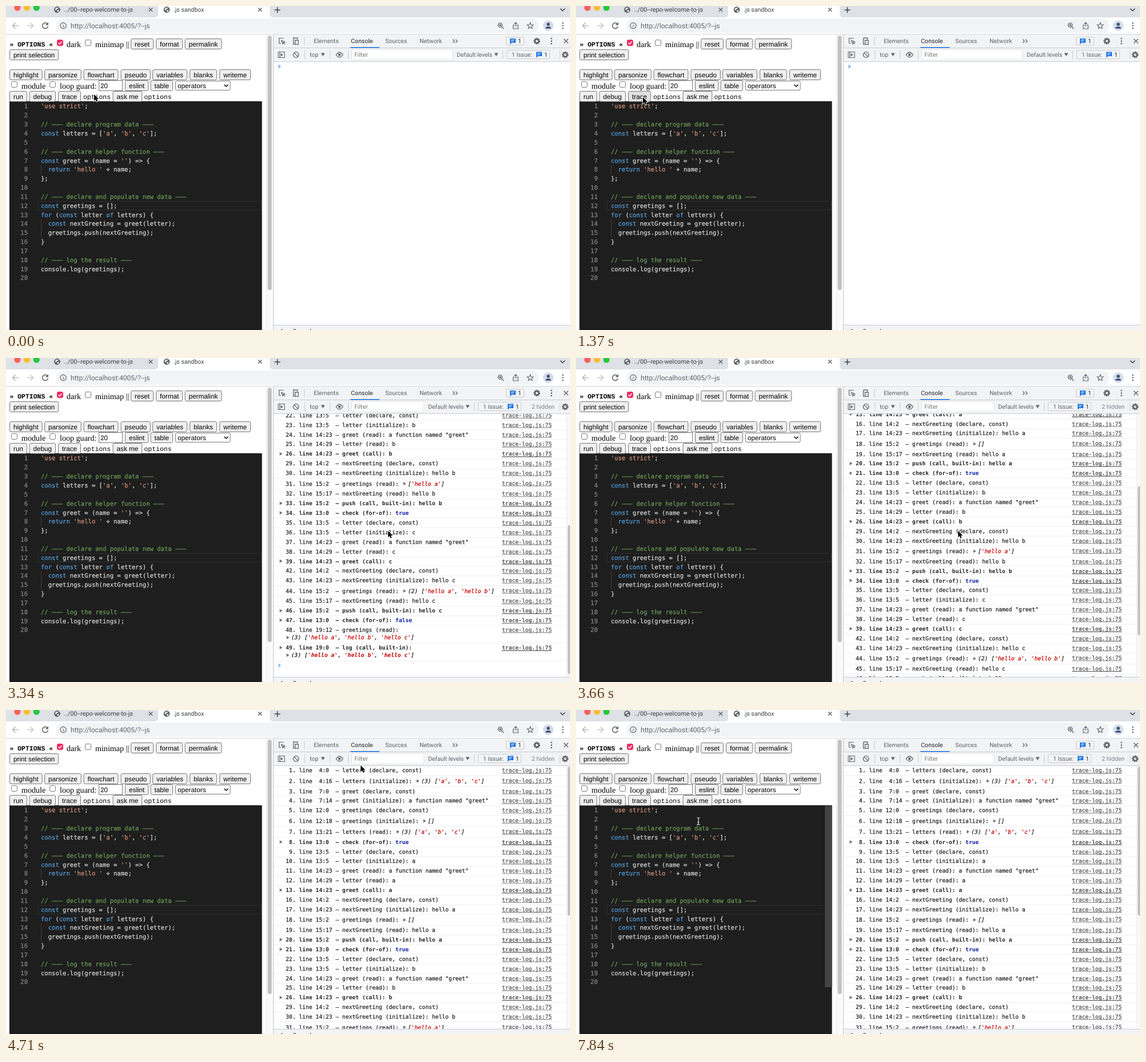
An HTML page with a canvas that plays this animation: 986x568 px, repeating every 7.99 s.

```html
<!DOCTYPE html>
<html lang="en">
<head>
<meta charset="utf-8">
<title>Code tracing</title>
<style>
html, body { margin: 0; width: 100%; height: 100%; overflow: hidden; background: #fff; }
canvas { display: block; }
</style>
</head>
<body>
<canvas width="986" height="568"></canvas>
<script>
const ctx = document.querySelector('canvas').getContext('2d');
const LOOP = 7990, TICK = 150;
const UI = 'Roboto, sans-serif';
const SANS = '"Liberation Sans", Arial, sans-serif';
const SERIF = '"Liberation Serif", Times, serif';
const MONO = '"DejaVu Sans Mono", monospace';
const TYPE = '"Liberation Mono", Courier, monospace';
const INK = '#5f6368', DARK = '#202124', BLUE = '#1a73e8', BAR = '#f1f3f4', RULE = '#cacdd1';

// ---------- drawing helpers ----------
function rect(x, y, w, h, fill, stroke, radius = 0) {
  ctx.beginPath();
  ctx.roundRect(x, y, w, h, radius);
  if (fill) { ctx.fillStyle = fill; ctx.fill(); }
  if (stroke) { ctx.strokeStyle = stroke; ctx.lineWidth = 1; ctx.stroke(); }
}
function circle(x, y, r, fill) {
  ctx.beginPath();
  ctx.arc(x, y, r, 0, 7);
  ctx.fillStyle = fill;
  ctx.fill();
}
function stroke(path, color = INK, width = 1.4, x = 0, y = 0) {
  ctx.save();
  ctx.translate(x, y);
  ctx.strokeStyle = color;
  ctx.lineWidth = width;
  ctx.stroke(new Path2D(path));
  ctx.restore();
}
function fill(path, color, x = 0, y = 0) {
  ctx.save();
  ctx.translate(x, y);
  ctx.fillStyle = color;
  ctx.fill(new Path2D(path));
  ctx.restore();
}
// y is the middle of the capitals; returns the x where the text ends
function text(str, x, y, size, family, color = '#000', style = '') {
  const baseline = y + size * 0.36;
  ctx.font = `${style} ${size}px ${family}`;
  ctx.fillStyle = ctx.strokeStyle = color;
  ctx.fillText(str, x, baseline);
  if (family === MONO && !style.includes('bold')) {
    ctx.lineWidth = .25; // slightly heavier code type
    ctx.strokeText(str, x, baseline);
  }
  return x + ctx.measureText(str).width;
}
const cross = (x, y, r = 3.2, color = INK) =>
  stroke(`M${-r} ${-r}L${r} ${r}M${r} ${-r}L${-r} ${r}`, color, 1.4, x, y);
const dots = (x, y, gap) => [-gap, 0, gap].forEach(d => circle(x, y + d, 1.3, INK));
const arrowRight = (x, y) => fill('M0 -3L4.8 0L0 3Z', '#6e6e6e', x, y);
const arrowDown = (x, y) => fill('M-3.4 -2.5H3.4L0 3Z', INK, x, y);

function gear(x, y) {
  ctx.setLineDash([2.2, 1.5]);
  stroke('M5 0A5 5 0 1 1 -5 0A5 5 0 1 1 5 0', INK, 1.8, x, y);
  ctx.setLineDash([]);
  stroke('M3.3 0A3.3 3.3 0 1 1 -3.3 0A3.3 3.3 0 1 1 3.3 0', INK, 2.4, x, y);
}
function globe(x, y) {
  circle(x, y, 5.4, INK);
  fill('M-3.5 -1.5Q-1 -4 2 -3.6Q1 -1 -1 -1Q-1 1 -3 1ZM0 1Q3 0 3.6 2Q2 4 0.5 4Z', '#fff', x, y);
}
function button(label, x, y, face = '#efefef') {
  ctx.font = `11.73px ${SANS}`;
  rect(x, y - 9, ctx.measureText(label).width + 13, 18, face, '#767676', 2.6);
  text(label, x + 6.5, y, 11.73, SANS);
}
function checkbox(x, y, checked) {
  rect(x + .5, y + .5, 10, 10, checked ? '#ee2a62' : '#fff', checked ? '#ee2a62' : '#767676', 2);
  if (checked) stroke('M2.6 5.8L4.6 7.9L8.6 3.2', '#fff', 1.6, x, y);
}
function issueBadge(x, y) {
  fill('M-5 -4.5H5V3H-2L-5 5.5Z', BLUE, x, y);
  stroke('M-3 -2H3M-3 .5H1', '#fff', 1, x, y);
  text('1', x + 9, y, 10.4, UI, DARK);
}

// ---------- browser frame ----------
function drawBrowser() {
  rect(0, 0, 986, 20, '#dee1e6');
  ['#ff5f57', '#febc2e', '#28c840'].forEach((c, i) => circle(20 + i * 16.6, 3, 5.6, c));
  fill('M260 20Q266 20 266 13V0H461V13Q461 20 467 20Z', '#fff');
  globe(89.5, 6.5);
  text('../00--repo-welcome-to-js', 102, 6, 10.8, UI, '#3c4043');
  cross(253, 6.5);
  globe(281, 6.5);
  text('.js sandbox', 293, 6, 10.5, UI, '#3c4043');
  cross(444, 6.5);
  stroke('M-5 0H5M0 -5V5', '#3c4043', 1.5, 474.5, 7);
  stroke('M-4 -2L0 2L4 -2', '#3c4043', 1.5, 973, 6.5);

  rect(0, 20, 986, 29, '#fff');
  rect(88, 22, 844, 25, BAR, null, 12.5);
  stroke('M5.5 0H-5M0 -5L-5 0L0 5', '#b4b7bb', 1.5, 16.5, 34.5);
  stroke('M-5.5 0H5M0 -5L5 0L0 5', '#c6c8cb', 1.5, 42.5, 34.5);
  stroke('M4 -3.2A5 5 0 1 0 5 1.2', INK, 1.6, 68.5, 34.5);
  fill('M0 -1H5.3V-6Z', INK, 68.7, 34.5);
  stroke('M5.2 0A5.2 5.2 0 1 1 -5.2 0A5.2 5.2 0 1 1 5.2 0M0 -.8V3M0 -3V-1.9', INK, 1.2, 100, 34.5);
  text('http://localhost:4005/?--js', 113, 34.5, 12.05, UI, '#5f6368');
  stroke('M2.6 -1A3.6 3.6 0 1 1 -4.6 -1A3.6 3.6 0 1 1 2.6 -1M1.6 1.8L5.4 5.4M-3 -1H1M-1 -3V1', INK, 1.4, 865, 34.5);
  stroke('M-2 -1H-4.3V5.5H4.3V-1H2M0 2V-5.3M-2.6 -3L0 -5.5L2.6 -3', INK, 1.2, 891, 34.5);
  stroke('M0 -5.2L1.5 -1.7L5.3 -1.4L2.4 1.1L3.3 4.8L0 2.8L-3.3 4.8L-2.4 1.1L-5.3 -1.4L-1.5 -1.7Z', INK, 1.2, 916.5, 34.5);
  circle(948, 34.5, 9.3, '#d5dcea');
  circle(948, 32, 2.7, '#3d4b6e');
  fill('M-5 5Q-5 1.5 0 1.5Q5 1.5 5 5Z', '#3d4b6e', 948, 34.5);
  dots(973.5, 34.5, 4.5);
  rect(0, 49, 986, 1, '#d5d7da');
}

// ---------- page on the left ----------
function drawOptions(traceFace) {
  text('» OPTIONS «', 6.5, 67, 11.44, TYPE, '#000', 'bold');
  checkbox(89, 59, true);
  text('dark', 106, 66.5, 14.08, SERIF);
  checkbox(138, 59);
  text('minimap ||', 156, 66.5, 14.08, SERIF);
  button('reset', 218.5, 66.5);
  button('format', 262.5, 66.5);
  button('permalink', 313, 66.5);
  button('print selection', 6.5, 85.5);

  [['highlight', 6.5], ['parsonize', 67.5], ['flowchart', 136], ['pseudo', 201], ['variables', 256.5],
   ['blanks', 321.5], ['writeme', 373.5]].forEach(([label, x]) => button(label, x, 120.5));

  checkbox(9, 132);
  text('module', 27, 139.5, 14.08, SERIF);
  checkbox(76, 132);
  text('loop guard:', 94, 139.5, 14.08, SERIF);
  rect(162.5, 130.5, 41, 18, '#fff', '#767676');
  text('20', 165, 139.5, 11.73, SANS);
  button('eslint', 208.5, 139.5);
  button('table', 253, 139.5);
  rect(296.5, 131.5, 95.5, 16, '#fff', '#767676', 2);
  text('operators', 300, 139.5, 11.73, SANS);
  stroke('M-3.5 -1.8L0 1.8L3.5 -1.8', '#000', 1.4, 385, 139.5);

  button('run', 6.5, 158.5);
  button('debug', 41, 158.5);
  button('trace', 91.5, 158.5, traceFace);
  text('options', 135, 159, 11.44, TYPE);
  button('ask me', 187, 158.5);
  text('options', 241.5, 159, 11.44, TYPE);
}

// Long dashes join into a rule, as in the editor's typeface.
const CODE = `'use strict';

// ––– declare program data –––
const letters = ['a', 'b', 'c'];

// ––– declare helper function –––
const greet = (name = '') => {
  return 'hello ' + name;
};

// ––– declare and populate new data –––
const greetings = [];
for (const letter of letters) {
  const nextGreeting = greet(letter);
  greetings.push(nextGreeting);
}

// ––– log the result –––
console.log(greetings);
`.split('\n');

function tokenColor(token) {
  if (token.startsWith('//')) return '#6a9955';
  if (token.startsWith("'")) return '#ce9178';
  return /^(const|for|of|return)$/.test(token) ? '#569cd6' : '#d4d4d4';
}
function drawEditor(hovered) {
  const size = 10.55, pitch = 15.84;
  rect(6, 167, 441.5, 401, '#1e1e1e');
  rect(55, 342.5, 391.5, 15, null, '#2f2f2f');
  rect(61, 279, 1, pitch, '#404040');
  rect(61, 374, 1, pitch * 2, '#404040');
  CODE.forEach((line, i) => {
    const y = 175.7 + i * pitch;
    ctx.textAlign = 'right';
    text(i + 1, 38, y, size, MONO, '#858585');
    ctx.textAlign = 'left';
    let x = 61;
    for (const token of line.match(/\/\/.*|'[^']*'|\w+|[^\w']+?(?=\/\/|\w|'|$)/g) || [])
      x = text(token, x, y, size, MONO, tokenColor(token));
  });
  if (hovered) rect(435, 168, 12.5, 318, '#424242');
}

const TRACE_OPTIONS = ['variables', 'declare', 'initialize', 'read', 'assign', 'functions', 'call', 'return',
  'built-in', 'operators', 'control flow', 'check', 'for-of', 'while', 'blocks', 'errors', 'this'];
function drawTraceOptions() {
  rect(134, 168, 168, 364, '#f9f9f9');
  TRACE_OPTIONS.forEach((label, i) => {
    const y = 185 + i * 20.6;
    checkbox(146, y - 6, true);
    text(label, 164, y, 14.08, SERIF);
  });
}

// ---------- trace log ----------
function buildTrace() {
  const rows = [], letters = ['a', 'b', 'c'], greetings = [];
  let step = 0, top = 0;
  const log = (place, message, extra = {}) => {
    const [line, col] = place.split(':');
    const at = `${line.padStart(2)}:${col}`.padEnd(5);
    const height = extra.wrap ? 31 : extra.list ? 19.2 : 16.9;
    rows.push({ text: `${String(++step).padStart(2)}. line ${at} – ${message}`, top, height, ...extra });
    top += height;
  };
  const bold = true, wrap = true;
  const check = flag => log('13:0', 'check (for-of): ', { bold, flag });

  log('4:0', 'letters (declare, const)');
  log('4:16', 'letters (initialize):', { list: letters });
  log('7:0', 'greet (declare, const)');
  log('7:14', 'greet (initialize): a function named "greet"');
  log('12:0', 'greetings (declare, const)');
  log('12:18', 'greetings (initialize):', { list: [] });
  log('13:21', 'letters (read):', { list: letters });
  for (const letter of letters) {
    const greeting = 'hello ' + letter;
    check('true');
    log('13:5', 'letter (declare, const)');
    log('13:5', `letter (initialize): ${letter}`);
    log('14:23', 'greet (read): a function named "greet"');
    log('14:29', `letter (read): ${letter}`);
    log('14:23', `greet (call): ${letter}`, { bold });
    step += 2; // collapsed inside the call
    log('14:2', 'nextGreeting (declare, const)');
    log('14:23', `nextGreeting (initialize): ${greeting}`);
    log('15:2', 'greetings (read):', { list: [...greetings] });
    log('15:17', `nextGreeting (read): ${greeting}`);
    log('15:2', `push (call, built-in): ${greeting}`, { bold });
    greetings.push(greeting);
  }
  check('false');
  log('19:12', 'greetings (read):', { list: greetings, wrap });
  log('19:0', 'log (call, built-in):', { list: greetings, wrap, bold });
  return { rows, height: top };
}
const trace = buildTrace();
const LOG_SIZE = 9.667;

function drawList(list, x, y, weight) {
  const put = (s, color = '#252525') => { x = text(s, x, y, LOG_SIZE, MONO, color, `italic ${weight}`); };
  arrowRight(x, y);
  x += 8;
  put((list.length > 1 ? `(${list.length}) ` : '') + '[');
  list.forEach((item, i) => {
    if (i) put(', ');
    put(`'${item}'`, '#c80000');
  });
  put(']');
}
function drawRow(row, y) {
  const weight = row.bold ? 'bold' : '';
  const single = row.list && !row.wrap;
  const mid = y + (single ? 10 : 8.4), linkMid = y + (single ? 8.9 : 8.4);
  rect(468, y, 512, 1, '#f0f0f0');
  if (row.bold) arrowRight(478.5, mid);
  const end = text(row.text, 489, mid, LOG_SIZE, MONO, '#252525', weight);
  if (row.flag) text(row.flag, end, mid, LOG_SIZE, MONO, '#0d22aa', weight);
  if (row.list) drawList(row.list, row.wrap ? 490.5 : end + 8, row.wrap ? mid + 13.3 : mid, weight);
  const linkEnd = text('trace-log.js:75', 867, linkMid, LOG_SIZE, MONO, '#545454', weight);
  rect(867, linkMid + 4.6, linkEnd - 867, row.bold ? 1.2 : .8, '#545454');
}
function drawConsole(filled, scroll) {
  ctx.save();
  ctx.beginPath();
  ctx.rect(468, 97, 518, 462);
  ctx.clip();
  let y = 97.6 - scroll;
  if (filled) {
    trace.rows.forEach(row => drawRow(row, y + row.top));
    y += trace.height;
    rect(468, y, 512, 1, '#f0f0f0');
    rect(980, 97, 6, 462, '#fafafa');
    rect(980, 97, 1, 462, '#e8e8e8');
    rect(982, 99 + scroll * .577, 8, 262, '#c1c1c1', null, 4);
  }
  stroke('M-1.8 -2.7L1.4 0L-1.8 2.7', '#4285f4', 1.2, 478, y + 8.6);
  ctx.restore();
}

// ---------- developer tools frame ----------
function drawTools(filled) {
  rect(467, 50, 1, 518, '#c4c6c9');
  rect(468, 50, 518, 47, BAR);
  rect(468, 73, 518, 1, RULE);
  rect(468, 97, 518, 1, RULE);
  stroke('M3 -5H-5V4H-2M-1 -1L5 1.4L2.4 2.4L1.4 5Z M2 2L5.4 5.4', INK, 1.2, 482.5, 61.5);
  stroke('M-3 -5.5H4V-3M-3 -5.5V5.5H-1M0 -1.5H5.5V5.8H0Z', INK, 1.3, 505.5, 61.5);
  rect(521, 54, 1, 15, RULE);
  [['Elements', 538], ['Console', 603], ['Sources', 663], ['Network', 723]].forEach(([tab, x]) =>
    text(tab, x, 61.5, 10.56, UI, tab === 'Console' ? DARK : INK));
  rect(602, 72, 51, 1.6, BLUE);
  stroke('M-4 -3L-1 0L-4 3M1 -3L4 0L1 3', INK, 1.2, 785, 61.5);
  rect(874.5, 54.5, 31, 14, BAR, RULE, 2);
  issueBadge(886, 61.5);
  gear(928, 61.5);
  dots(953.5, 61.5, 4.4);
  cross(979, 61.5, 3.8);

  stroke('M-5.5 -5H5.5V5H-5.5ZM-2.8 -5V5', INK, 1.1, 481.5, 85.5);
  fill('M0 -2.8L4 0L0 2.8Z', INK, 480.5, 85.5);
  stroke('M4.8 0A4.8 4.8 0 1 1 -4.8 0A4.8 4.8 0 1 1 4.8 0M-3.4 -3.4L3.4 3.4', INK, 1.3, 507, 85.5);
  rect(522, 78, 1, 15, RULE);
  text('top', 531, 85, 10.56, UI, INK);
  arrowDown(554, 85);
  rect(566, 78, 1, 15, RULE);
  stroke('M-6 0Q0 -8.5 6 0Q0 8.5 -6 0Z', INK, 1.3, 583, 85.5);
  circle(583, 85.5, 2.2, INK);
  rect(598, 78, 1, 15, RULE);

  const shift = filled ? -50 : 0;
  rect(604.5, 76.5, 176 + shift, 18, '#fff', '#e3e5e8');
  text('Filter', 609, 85.5, 10.56, UI, '#757575');
  text('Default levels', 788 + shift, 85, 10.4, UI, INK);
  arrowDown(857 + shift, 85);
  rect(868 + shift, 78, 1, 15, RULE);
  rect(875.5 + shift, 77.5, 75, 15, BAR, RULE, 2);
  text('1 Issue:', 884 + shift, 85, 10.4, UI, INK);
  issueBadge(932 + shift, 85);
  if (filled) text('2 hidden', 919, 85.5, 10.5, UI, '#80868b');
  rect(968, 78, 1, 15, RULE);
  gear(977.5, 85.5);

  rect(468, 559, 518, 9, BAR);
  rect(468, 559, 518, 1, RULE);
  circle(482, 568, 1.4, INK);
  text('Console', 501, 570.5, 10.56, UI, DARK);
}

// ---------- motion ----------
const POINTER = [
  [0, 154, 155], [7, 154, 156], [9, 117, 160], [15, 117, 160], [18, 668, 303], [28, 668, 303],
  [29, 667, 290], [31, 620, 97], [32, 608, 92], [36, 550, 106], [38, 552, 108], [40, 631, 124],
  [42, 570, 150], [44, 587, 185], [45, 592, 202], [48, 624, 243], [49, 624, 243], [50, 500, 228],
  [51, 178, 200], [52, 214, 195]];
const SCROLL = [[0, 342], [21, 342], [22, 336], [24, 217.5], [25, 90], [26, 0]];

function along(keys, tick) {
  const next = keys.findIndex(key => key[0] > tick);
  if (next < 0) return keys.at(-1).slice(1);
  const [from, to] = [keys[next - 1], keys[next]];
  const part = (tick - from[0]) / (to[0] - from[0]);
  return from.slice(1).map((v, i) => v + (to[i + 1] - v) * part);
}
function drawPointer(x, y, overEditor) {
  if (overEditor) {
    const beam = 'M-2.6 -6.3Q0 -6.3 0 -4.5V4.5Q0 6.3 -2.6 6.3M2.6 -6.3Q0 -6.3 0 -4.5V4.5Q0 6.3 2.6 6.3M-1.5 2H1.5';
    stroke(beam, '#111', 2.4, x, y);
    stroke(beam, '#fff', 1.1, x, y);
    return;
  }
  const arrow = 'M0 0V11.4L2.6 9L4.3 12.9L6.3 12L4.6 8.3H8.2Z';
  stroke(arrow, '#fff', 1.6, x, y);
  fill(arrow, '#000', x, y);
}

function draw(time) {
  // The screen refreshes in even steps, as a low-rate recording does.
  const tick = Math.min(52, Math.max(0, Math.floor((time - 15) / TICK)));
  const [x, y] = along(POINTER, tick);
  const filled = tick >= 15;
  const overTrace = x >= 91 && x <= 131 && y >= 149 && y <= 168;
  const pressed = tick === 13 || tick === 14;
  const overEditor = x > 6 && x < 447 && y > 168;

  ctx.textRendering = 'geometricPrecision';
  rect(0, 0, 986, 568, '#fff');
  drawBrowser();
  drawEditor(overEditor);
  drawOptions(pressed ? '#f5f5f5' : overTrace ? '#e0e0e0' : '#efefef');
  if (tick >= 2 && tick < 8) drawTraceOptions();
  rect(455, 50, 12, 518, '#fafafa');
  rect(455, 50, 1, 518, '#e8e8e8');
  rect(457.5, 52, 7, 446, '#c1c1c1', null, 3.5);
  drawConsole(filled, filled ? along(SCROLL, tick)[0] : 0);
  drawTools(filled);
  drawPointer(x, y, overEditor);
}

const start = performance.now();
function frame() {
  draw((performance.now() - start) % LOOP);
  requestAnimationFrame(frame);
}
frame();
</script>
</body>
</html>
```
